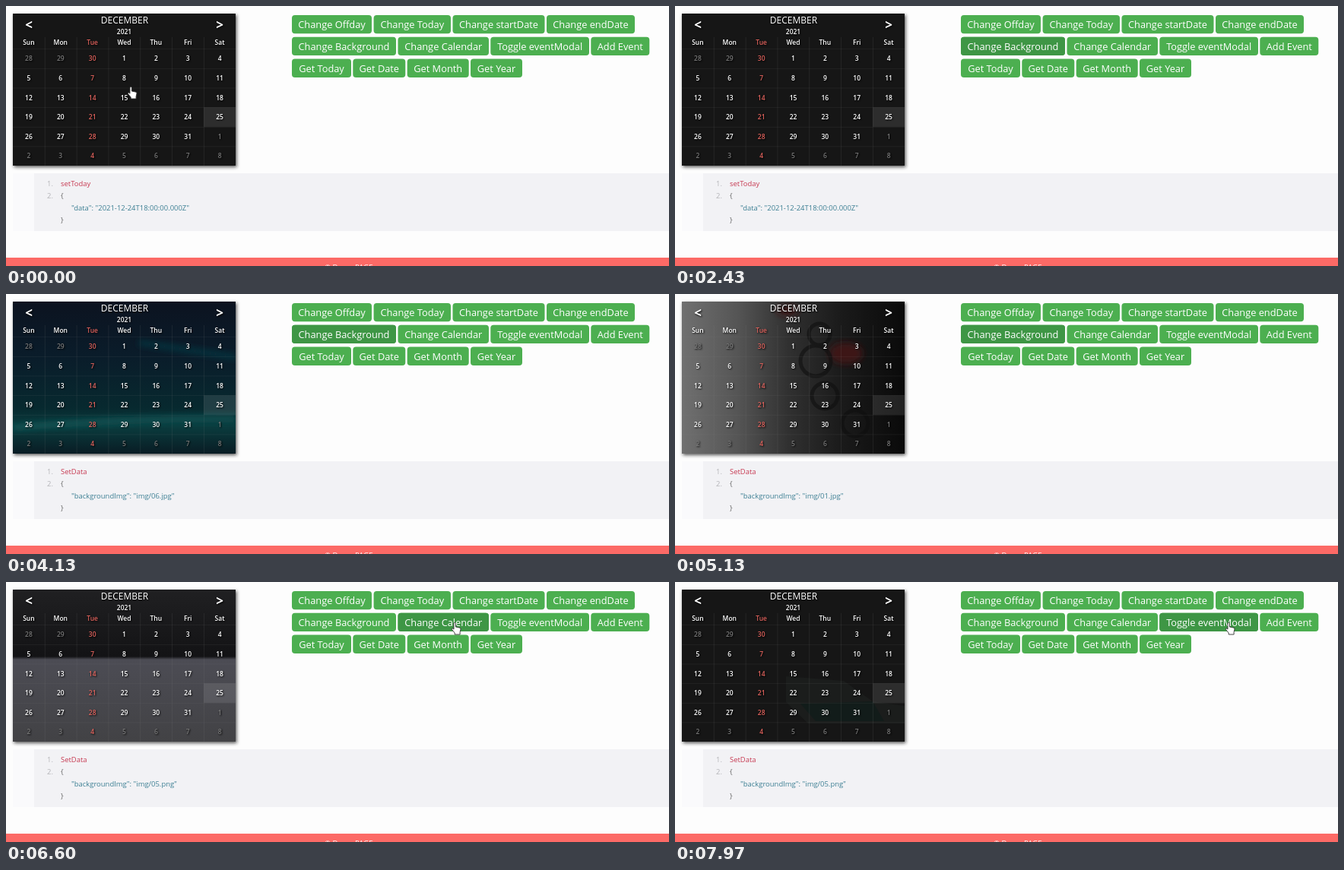
These frames come from a looping animation (872x342 px, 8 s). An HTML page:

```html
<!DOCTYPE html>
<html lang="en">
<head>
<meta charset="utf-8">
<title>Calendar demo</title>
<style>
html, body { margin: 0; width: 100%; height: 100%; overflow: hidden; background: #fdfdfd; }
svg { display: block; width: 872px; height: 342px; font-family: "Open Sans", sans-serif; }
.mid { text-anchor: middle; }
.day { font-size: 8.5px; font-weight: 600; }
.code { font-size: 9.45px; }
.btn { font-size: 12.8px; fill: #fff; }
.labels { filter: drop-shadow(1px 1px 1px #000); }
.cursor { animation: move 8s linear infinite; }
.hand { animation: hand 8s step-end infinite; }
.arrow { animation: arrow 8s step-end infinite; }
@keyframes move {
  0%, 3% { transform: translate(163px, 106px); animation-timing-function: ease-in-out; }
  14%, 16.5% { transform: translate(557px, 123px); animation-timing-function: ease-in-out; }
  24%, 71% { transform: translate(454px, 33px); animation-timing-function: ease-in-out; }
  78%, 89% { transform: translate(589px, 53px); animation-timing-function: ease-in-out; }
  95%, 100% { transform: translate(727px, 53px); }
}
@keyframes hand {
  0% { opacity: 1; } 7.5% { opacity: 0; } 20% { opacity: 1; } 26% { opacity: 0; }
  36% { opacity: 1; } 45% { opacity: 0; } 70%, 100% { opacity: 1; }
}
@keyframes arrow {
  0% { opacity: 0; } 7.5% { opacity: 1; } 20%, 100% { opacity: 0; }
}
</style>
</head>
<body>
<svg id="stage" viewBox="0 0 872 342">
  <defs>
    <filter id="shadow" x="-5%" y="-5%" width="112%" height="114%">
      <feDropShadow dx="1.5" dy="2" stdDeviation="2" flood-color="#222" flood-opacity=".75"/>
    </filter>
    <filter id="soft" x="-20%" y="-50%" width="140%" height="200%"><feGaussianBlur stdDeviation="4"/></filter>
    <clipPath id="frame"><rect x="9" y="10" width="293" height="200"/></clipPath>
    <linearGradient id="night" x2="0" y2="1">
      <stop stop-color="#0c1320"/><stop offset=".35" stop-color="#0a1c2a"/>
      <stop offset=".7" stop-color="#07292f"/><stop offset=".82" stop-color="#0a3c3e"/>
      <stop offset="1" stop-color="#091c24"/>
    </linearGradient>
    <linearGradient id="metal">
      <stop stop-color="#707070"/><stop offset=".25" stop-color="#555"/>
      <stop offset=".48" stop-color="#303030"/><stop offset=".72" stop-color="#1a1a1a"/>
      <stop offset="1" stop-color="#0a0a0a"/>
    </linearGradient>
    <linearGradient id="plain" x2="0" y2="1">
      <stop stop-color="#202022"/><stop offset=".44" stop-color="#131315"/>
      <stop offset=".46" stop-color="#4c4c54"/><stop offset="1" stop-color="#424245"/>
    </linearGradient>
  </defs>

  <rect width="872" height="342" fill="#fdfdfd"/>
  <rect x="9" y="220" width="28" height="76" fill="#fafafc"/>
  <rect x="37" y="220" width="835" height="76" fill="#f2f2f5"/>
  <rect y="331" width="872" height="11" fill="#fc6a66"/>
  <text x="419" y="347" font-size="9.6" fill="#fff">© Demo PAGE</text>

  <rect x="9" y="10" width="293" height="200" fill="#141414" filter="url(#shadow)"/>
  <g clip-path="url(#frame)">
    <g id="aurora">
      <rect x="9" y="10" width="293" height="200" fill="url(#night)"/>
      <g fill="none" stroke="#126061" stroke-width="5" filter="url(#soft)">
        <path d="M9 176Q130 164 302 164"/>
        <path d="M175 64L302 83" stroke="#0e3c46"/>
      </g>
    </g>
    <g id="gears">
      <rect x="9" y="10" width="293" height="200" fill="url(#metal)"/>
      <g fill="#3d1517" filter="url(#soft)">
        <ellipse cx="148" cy="22" rx="14" ry="6"/>
        <ellipse cx="225" cy="78" rx="22" ry="14"/>
      </g>
      <g fill="none" stroke="#0f0f0f" stroke-width="5" opacity=".6">
        <circle cx="185" cy="88" r="20"/><circle cx="197" cy="134" r="17"/>
        <circle cx="237" cy="170" r="17"/><circle cx="190" cy="53" r="14"/>
      </g>
    </g>
    <rect id="slate" x="9" y="10" width="293" height="200" fill="url(#plain)"/>
    <g id="hills">
      <path d="M146 124L222 130L260 157L302 163V186H175L146 158Z" fill="#1b1d1c"/>
      <path d="M165 160L260 157L275 183H185Z" fill="#121c1a"/>
    </g>
  </g>
  <g id="calendar"></g>
  <g id="buttons"></g>
  <g id="log"></g>

  <g class="cursor" stroke-linejoin="round">
    <path class="arrow" d="M0 0V11L2.6 8.7L4.5 12.6L6.3 11.8L4.5 8H8Z" fill="#fff" stroke="#555" stroke-width=".9"/>
    <path class="hand" d="M0 1.2Q1.2 -.8 2.4 1.2V6L8 7.2Q9.2 7.6 9 9L8.1 13V16H1.2V14L-2.6 9.4Q-2.7 7.6 -1.2 8.1L0 9.2Z" fill="#fff" stroke="#333" stroke-width=".9"/>
  </g>
</svg>
<script>
const byId = id => document.getElementById(id);
const text = (x, y, label, attrs = "") => `<text x="${x}" y="${y}" ${attrs}>${label}</text>`;
const rect = (x, y, w, h, attrs) => `<rect x="${x}" y="${y}" width="${w}" height="${h}" ${attrs}/>`;
let rules = "";

// Shows an element between two percentages of the loop.
function during(id, from, to, fade = 0.01) {
  const start = from ? `0%,${from}%{opacity:0}${from + fade}%{opacity:1}` : "0%{opacity:1}";
  const end = to < 100 ? `${to}%{opacity:1}${to + fade}%,100%{opacity:0}` : "100%{opacity:1}";
  rules += `@keyframes on-${id}{${start}${end}}#${id}{animation:on-${id} 8s linear infinite}`;
}

function drawCalendar() {
  const left = 9, cell = 293 / 7, top = 56.3, row = 25.65;
  const center = c => left + (c + 0.5) * cell;
  const red = "#e0625c";
  let grid = rect(left + 6 * cell, top + 3 * row, cell, row, 'fill="#fff" opacity=".1"');
  for (let c = 1; c < 7; c++)
    grid += rect(left + c * cell, 41, 0.7, 169, 'fill="#888" opacity=".2"');
  for (let r = 0; r < 6; r++)
    grid += rect(left, top + r * row, 293, 0.7, 'fill="#888" opacity=".15"');

  let labels = text(156, 23.4, "DECEMBER", 'class="mid" font-size="12" fill="#fff"');
  labels += text(155.5, 36.6, "2021", 'class="mid day" fill="#fff"');
  for (const [x, sign] of [[30, "&lt;"], [281, "&gt;"]])
    labels += text(x, 31, sign, 'class="mid" font-size="17" font-weight="700" fill="#fff"');
  ["Sun", "Mon", "Tue", "Wed", "Thu", "Fri", "Sat"].forEach((name, c) => {
    labels += text(center(c), 51.2, name, `class="mid day" fill="${c === 2 ? red : "#fff"}"`);
  });
  for (let i = 0; i < 42; i++) {
    const n = i - 2, c = i % 7;
    const label = n < 1 ? n + 30 : n > 31 ? n - 31 : n;
    const color = c === 2 ? red : n < 1 || n > 31 ? "#777" : "#fff";
    labels += text(center(c), 72.2 + Math.floor(i / 7) * row, label, `class="mid day" fill="${color}"`);
  }
  byId("calendar").innerHTML = `${grid}<g class="labels">${labels}</g>`;
}

function drawButtons() {
  const rows = [
    [["Change Offday", 376, 481], ["Change Today", 483.6, 585], ["Change startDate", 587.5, 708.5], ["Change endDate", 711, 827]],
    [["Change Background", 376, 513], ["Change Calendar", 515.5, 635], ["Toggle eventModal", 637.3, 767], ["Add Event", 769.3, 846.3]],
    [["Get Today", 376, 454], ["Get Date", 456.3, 525.3], ["Get Month", 527.7, 608.7], ["Get Year", 611, 679]]
  ];
  const hovers = {
    "Get Date": [19.6, 21], "Change Background": [21.2, 74],
    "Change Calendar": [74, 91.6], "Toggle eventModal": [91.6, 100]
  };
  let out = "";
  rows.forEach((row, r) => row.forEach(([label, x1, x2]) => {
    const y = 12 + r * 28.8, box = [x1, y, x2 - x1, 24.3];
    out += rect(...box, 'rx="4" fill="#4caf50"');
    if (hovers[label]) {
      const id = label.replace(" ", "-");
      out += rect(...box, `id="${id}" rx="4" fill="#3e9645"`);
      during(id, ...hovers[label]);
    }
    out += text((x1 + x2) / 2, y + 17.1, label, 'class="mid btn"');
  }));
  byId("buttons").innerHTML = out;
}

function drawLog() {
  const entries = [
    ["setToday", "data", "2021-12-24T18:00:00.000Z", 0, 34],
    ["SetData", "backgroundImg", "img/06.jpg", 34, 53],
    ["SetData", "backgroundImg", "img/01.jpg", 53, 70],
    ["SetData", "backgroundImg", "img/05.png", 70, 100]
  ];
  let out = text(54, 236.6, "1.", 'class="code" fill="#b4b4b8"') +
    text(54, 252.8, "2.", 'class="code" fill="#b4b4b8"') +
    text(72, 252.8, "{", 'class="code" fill="#666"') +
    text(72, 284.8, "}", 'class="code" fill="#666"');
  entries.forEach(([name, key, value, from, to], i) => {
    out += `<g id="entry${i}" class="code">` + text(72, 236.6, name, 'fill="#c73a52"') +
      text(86, 268.8, `"${key}": "${value}"`, 'fill="#3c7f93"') + "</g>";
    during(`entry${i}`, from, to);
  });
  byId("log").innerHTML = out;
}

drawCalendar();
drawButtons();
drawLog();
during("aurora", 34, 53, 4);
during("gears", 53, 70, 4);
during("slate", 70, 89, 4);
during("hills", 91, 100, 3);
document.head.insertAdjacentHTML("beforeend", `<style>${rules}</style>`);
</script>
</body>
</html>
```
